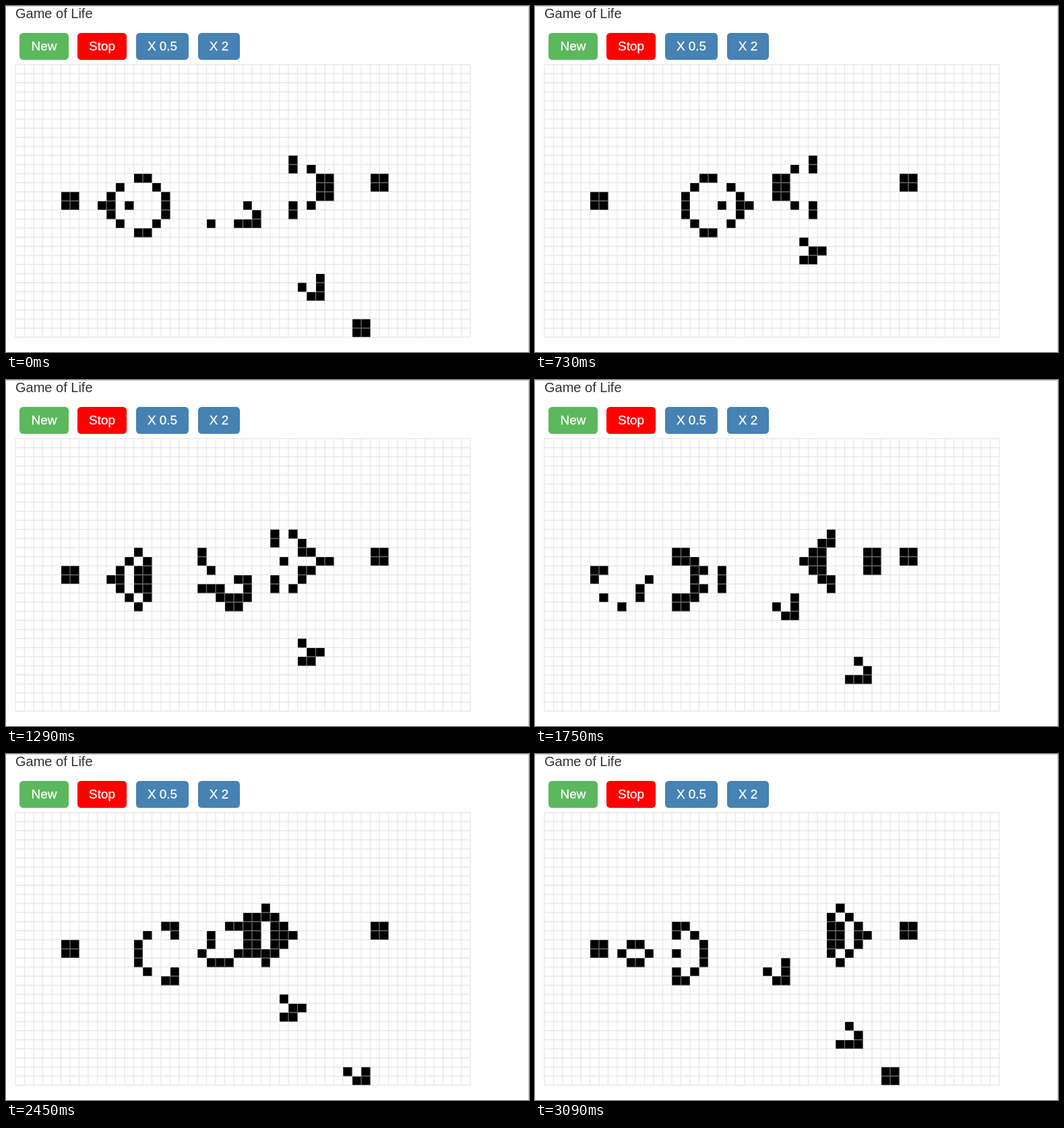
Recreate the animation shown at these times as an HTML page. Size 776 px wide and 514 px high, loop 3140 ms.

```html
<!DOCTYPE html>
<html lang="en">
<head>
<meta charset="utf-8">
<title>Game of Life</title>
<style>
  html, body { margin: 0; width: 100%; height: 100%; overflow: hidden; background: #fff; }
  svg { display: block; font-family: "Liberation Sans", Arial, sans-serif; }
  .button text { font-size: 18.9px; fill: #fff; stroke: #fff; stroke-width: .3px; text-anchor: middle; }
</style>
</head>
<body>
<svg width="776" height="514" viewBox="0 0 776 514">
  <path d="M0 0H776V514H775V1H0Z" fill="#c9c9c9"/>
  <text x="14" y="18" font-size="20" fill="#333">Game of Life</text>
  <g class="button"><rect x="20" y="40" width="73" height="40" rx="5.4" fill="#5cb85c"/><text x="56.5" y="66">New</text></g>
  <g class="button"><rect x="106" y="40" width="73" height="40" rx="5.4" fill="#f00"/><text x="142.5" y="66">Stop</text></g>
  <g class="button"><rect x="193" y="40" width="78" height="40" rx="5.4" fill="#4682b4"/><text x="232" y="66">X 0.5</text></g>
  <g class="button"><rect x="285" y="40" width="62" height="40" rx="5.4" fill="#4682b4"/><text x="316" y="66">X 2</text></g>
  <path id="cells" shape-rendering="crispEdges"/>
  <path id="lines" stroke="lightgray" stroke-width="1.35" stroke-opacity=".5"/>
</svg>
<script>
const COLS = 50, ROWS = 30, SIZE = 13.5, LEFT = 14, TOP = 87;
const LOOP = 3140, WARM_UP = 75;

// Gosper glider gun in run-length notation, placed on the empty board.
const GUN = "24bo$22bobo$12b2o6b2o12b2o$11bo3bo4b2o12b2o$2o8bo5bo3b2o$" +
  "2o8bo3bob2o4bobo$10bo5bo7bo$11bo3bo$12b2o";
const GUN_COL = 5, GUN_ROW = 10;

// Key points of the slightly uneven pace: [time in ms, generation].
const PACE = [[0, 0], [30, 1], [260, 6], [730, 15], [1290, 27], [1750, 36], [2450, 49], [3090, 62], [LOOP, 62]];

const byId = id => document.getElementById(id);
const edgeX = col => Math.round(LEFT + col * SIZE);
const edgeY = row => Math.round(TOP + row * SIZE);

const makeGrid = rule => Array.from({ length: ROWS }, (_, row) =>
  Array.from({ length: COLS }, (_, col) => rule(row, col)));

function placeGun() {
  const grid = makeGrid(() => 0);
  GUN.split("$").forEach((line, row) => {
    let col = GUN_COL;
    for (const [, count, kind] of line.matchAll(/(\d*)([bo])/g)) {
      const end = col + Number(count || 1);
      grid[GUN_ROW + row].fill(kind === "o" ? 1 : 0, col, end);
      col = end;
    }
  });
  return grid;
}

function neighbours(grid, row, col) {
  let count = -grid[row][col];
  for (let r = row - 1; r <= row + 1; r++)
    for (let c = col - 1; c <= col + 1; c++) count += grid[r]?.[c] ?? 0;
  return count;
}

const evolve = grid => makeGrid((row, col) => {
  const n = neighbours(grid, row, col);
  return n === 3 || (n === 2 && grid[row][col]) ? 1 : 0;
});

const cellPath = grid => grid.map((line, row) => line.map((on, col) => on
  ? `M${edgeX(col)} ${edgeY(row)}H${edgeX(col + 1)}V${edgeY(row + 1)}H${edgeX(col)}z`
  : "").join("")).join("");

function linePath() {
  let d = "";
  for (let c = 0; c <= COLS; c++) d += `M${LEFT + c * SIZE} ${TOP}v${ROWS * SIZE}`;
  for (let r = 0; r <= ROWS; r++) d += `M${LEFT} ${TOP + r * SIZE}h${COLS * SIZE}`;
  return d;
}

function generationAt(time) {
  const i = PACE.findIndex(([end]) => time < end);
  const [t0, g0] = PACE[i - 1], [t1, g1] = PACE[i];
  return Math.floor(g0 + (g1 - g0) * (time - t0) / (t1 - t0) + 1e-6);
}

let grid = placeGun();
for (let g = 0; g < WARM_UP; g++) grid = evolve(grid);

const history = [];
for (let g = 0; g <= PACE.at(-1)[1]; g++) {
  history.push(cellPath(grid));
  grid = evolve(grid);
}

function render(time) {
  byId("cells").setAttribute("d", history[generationAt(time % LOOP)]);
}

byId("lines").setAttribute("d", linePath());
render(0);
let start;
requestAnimationFrame(function tick(now) {
  start ??= now;
  render(now - start);
  requestAnimationFrame(tick);
});
</script>
</body>
</html>
```
